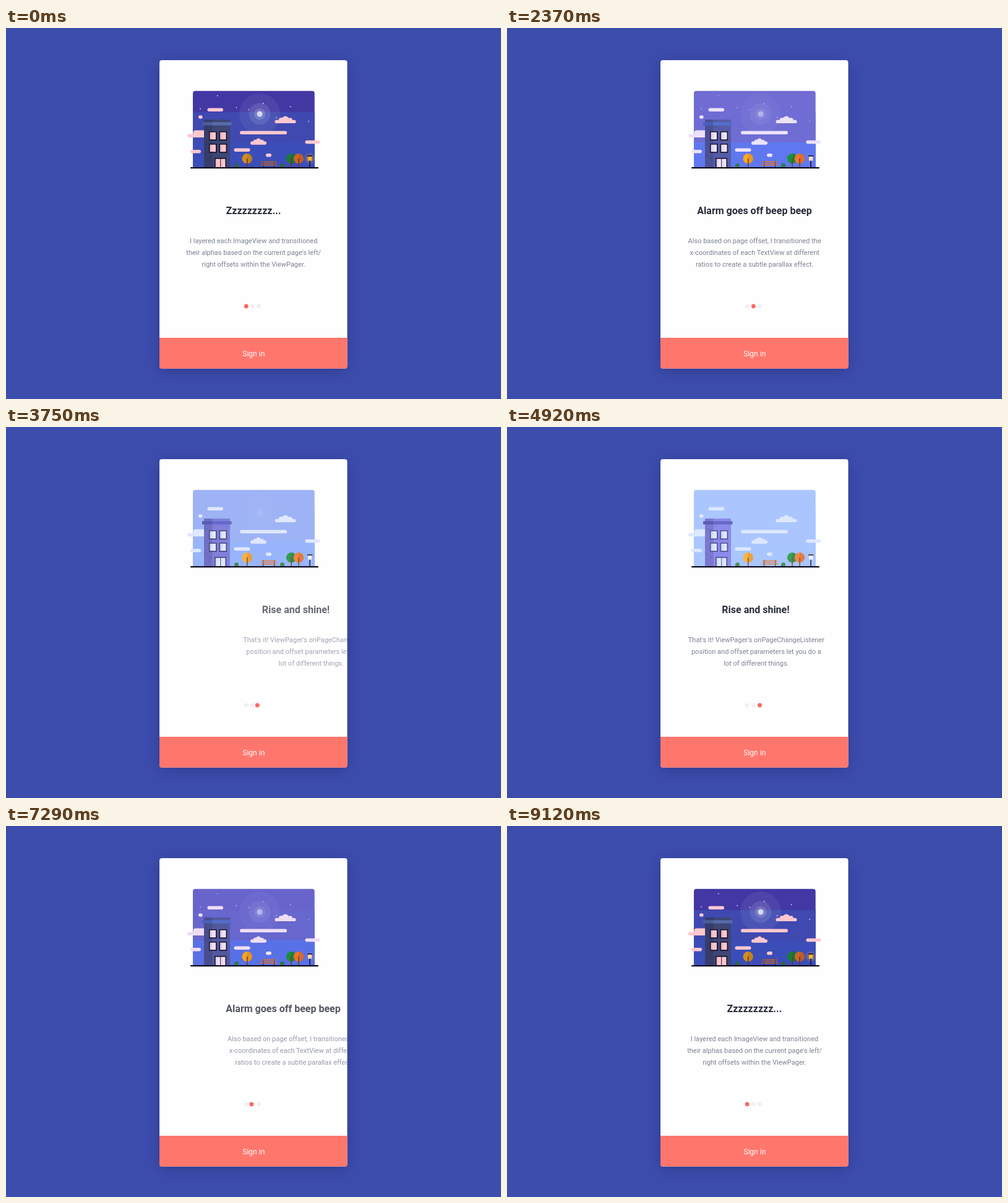
Write an HTML page that moves like this. It is 800x600 px and loops after 9150 ms.

```html
<!DOCTYPE html>
<html lang="en">
<head>
<meta charset="utf-8">
<title>Onboarding pager</title>
<style>
  html, body { margin: 0; width: 100%; height: 100%; overflow: hidden; background: #3d4dae; }
  svg { display: block; width: 800px; height: 600px; }
  text { font-family: Roboto, sans-serif; text-anchor: middle; }
  .title { font-size: 16px; font-weight: 700; fill: #272c39; }
  .body { font-size: 11px; fill: #7a8193; }
  .button { font-size: 12px; fill: #fff; }
  .card { filter: drop-shadow(0 4px 12px rgba(15, 20, 70, .3)); }
</style>
</head>
<body>
<svg viewBox="0 0 800 600">
  <defs>
    <clipPath id="cardClip"><rect x="248" y="52" width="303.5" height="498.7" rx="4"/></clipPath>
    <clipPath id="skyClip"><rect x="302" y="101.7" width="196.7" height="140" rx="4"/></clipPath>
    <radialGradient id="glow">
      <stop offset="0" stop-color="#ffb52c" stop-opacity=".55"/>
      <stop offset="1" stop-color="#ffb52c" stop-opacity="0"/>
    </radialGradient>
  </defs>
  <rect width="800" height="600" fill="#3d4dae"/>
  <rect class="card" x="248" y="52" width="303.5" height="498.7" rx="4" fill="#fefefe"/>
  <g clip-path="url(#cardClip)">
    <g id="scene"></g>
    <g id="pages"></g>
    <g id="dots"></g>
    <rect x="248" y="501" width="304" height="50" fill="#ff766c"/>
    <text class="button" x="400.3" y="531">Sign in</text>
  </g>
</svg>
<script>
const LOOP = 9150, STEP = 30;
const TITLE_SHIFT = 304, BODY_SHIFT = 413, TEXT_FADE = 1.3;
const DRAG_PART = 0.35, DRAG_POWER = 2.14;

// A slow drag, then a fling that settles on the next page
const SWIPES = [
  { start: 0, release: 1558, end: 2311, from: 0, to: 1 },
  { start: 2590, release: 3493, end: 4839, from: 1, to: 2 },
  { start: 4780, release: 5686, end: 6992, from: 2, to: 1 },
  { start: 6690, release: 7560, end: 9584, from: 1, to: 0 }
];

const PAGES = [
  ["Zzzzzzzzz...",
    "I layered each ImageView and transitioned",
    "their alphas based on the current page's left/",
    "right offsets within the ViewPager."],
  ["Alarm goes off beep beep",
    "Also based on page offset, I transitioned the",
    "x-coordinates of each TextView at different",
    "ratios to create a subtle parallax effect."],
  ["Rise and shine!",
    "That's it! ViewPager's onPageChangeListener",
    "position and offset parameters let you do a",
    "lot of different things."]
];

const NS = "http://www.w3.org/2000/svg";
const byId = id => document.getElementById(id);
const scene = byId("scene");
const painted = [], faded = [];

const lerp = (a, b, k) => a + (b - a) * k;
const rgb = hex => [1, 3, 5].map(i => parseInt(hex.slice(i, i + 2), 16));
const blend = (a, b, k) => a.map((c, i) => lerp(c, b[i], k));

// Colours for night, dawn and day; lit() derives all three from the dawn colour
const tones = (...hexes) => hexes.map(rgb);
const lit = hex => [blend(rgb(hex), [10, 10, 30], 0.17), rgb(hex), blend(rgb(hex), [255, 255, 255], 0.13)];

const SKY_TOP = tones("#4337a4", "#706cd3", "#abc7ff");
const SKY_MID = tones("#3f49b0", "#6f6dd4", "#abc7ff");
const SKY_LOW = tones("#3b4db8", "#5f78ef", "#a9c7ff");
const CLOUD = tones("#ffc8cf", "#ece2fa", "#dde8ff");
const WALL = tones("#3d4674", "#565ca6", "#8c8aea");
const ROOF = tones("#566ba9", "#536fd0", "#6967c8");
const FRAME = tones("#17132c", "#1c1838", "#54529c");
const GLASS = tones("#ffc8cf", "#efe5fb", "#dcebff");
const LAMP = tones("#f9b324", "#fbe1bd", "#edf1ff");
const METAL = lit("#1c1838"), GROUND = tones("#0d0b1d", "#0d0b1d", "#0d0b1d");
const TRUNK = lit("#74421f"), BUSH = lit("#217a40"), BENCH = lit("#d8763d");
const AMBER = lit("#fba826"), GREEN = lit("#1d9140"), ORANGE = lit("#f37730");

let seed = 11;
function random(min, max) {
  seed = (seed * 16807) % 2147483647;
  return lerp(min, max, seed / 2147483647);
}

function add(parent, tag, attrs, text) {
  const el = document.createElementNS(NS, tag);
  for (const key in attrs) el.setAttribute(key, attrs[key]);
  if (text) el.textContent = text;
  parent.appendChild(el);
  return el;
}
function paint(el, colors) {
  painted.push({ el, colors });
  return el;
}
function fade(el, ...levels) {
  faded.push({ el, levels });
  return el;
}
const rect = (x, y, width, height, colors, rx = 0, parent = scene) =>
  paint(add(parent, "rect", { x, y, width, height, rx }), colors);
const disc = (cx, cy, r, colors) => paint(add(scene, "circle", { cx, cy, r }), colors);
const shade = (x, y, width, height, opacity) =>
  add(scene, "rect", { x, y, width, height, fill: "#0f0c2b", opacity });

function drawSky() {
  const sky = add(scene, "g", { "clip-path": "url(#skyClip)" });
  rect(302, 101, 197, 125, SKY_TOP, 0, sky);
  rect(302, 136, 197, 90, SKY_MID, 0, sky);
  rect(302, 185, 197, 41, SKY_LOW, 0, sky);

  const stars = fade(add(scene, "g", { fill: "#fff" }), 0.9, 0.5, 0);
  for (let i = 0; i < 8; i++)
    add(stars, "circle", { cx: 320 + 24 * i + random(-6, 6), cy: random(107, 160), r: 0.85 });

  for (let i = 0; i < 3; i++) {
    const halo = add(scene, "circle", { cx: 410, cy: 139, r: 33 * 0.53 ** i, fill: "#f3f2ff" });
    fade(halo, 0.06 + 0.05 * i, 0.03 + 0.025 * i, 0);
  }
  fade(add(scene, "circle", { cx: 410, cy: 139, r: 4.5, fill: "#f3f2ff" }), 0.78, 0.42, 0);
}

const strip = (x, y, w) => rect(x, y, w, 5.4, CLOUD, 2.7);
function cloud(x, y, w) {
  strip(x, y, w);
  disc(x + w * 0.3, y, w * 0.11, CLOUD);
  disc(x + w * 0.5, y - 0.5, w * 0.165, CLOUD);
  disc(x + w * 0.72, y + 0.3, w * 0.11, CLOUD);
}

function drawClouds() {
  strip(325.5, 129.5, 25.5);
  strip(311, 141.3, 6.6);
  strip(378, 166.5, 76);
  strip(483.5, 181.8, 24);
  strip(368.5, 194.6, 26);
  strip(298, 197, 17);
  strip(420, 203, 9);
  strip(293, 171.5, 36);
  rect(302.5, 165.5, 26, 9, CLOUD, 4);
  cloud(434.5, 148.7, 34);
  cloud(395, 183.3, 26);
}

function drawHouse() {
  rect(320, 148, 42, 78, WALL);
  for (let i = 0; i < 14; i++)
    shade(random(321, 357), 160 + 4.5 * i, 3.5, 1, 0.2);
  shade(320, 148, 13.5, 78, 0.14);
  rect(317, 152.3, 47.5, 5.2, ROOF, 0.5);
  shade(317, 152.3, 16.5, 5.2, 0.14);

  for (const y of [167, 187]) for (const x of [328, 344.5]) {
    rect(x, y, 12.6, 15, FRAME);
    rect(x + 1.6, y + 1.6, 9.4, 11.6, GLASS);
    shade(x + 1.6, y + 1.6, 4, 11.6, 0.06);
  }
  rect(337, 210, 19, 16, FRAME);
  for (const x of [338.7, 347]) {
    rect(x, 211.7, 7.4, 14, GLASS);
    shade(x, 211.7, 3, 14, 0.06);
  }
}

function drawTree(x, leaves) {
  disc(x, 211.3, 8.2, leaves);
  add(scene, "path", { d: `M${x} 203.1a8.2 8.2 0 0 1 0 16.4Z`, fill: "#3a1608", opacity: 0.1 });
  rect(x - 0.8, 211, 1.6, 15, TRUNK);
}

function drawBush(x) {
  disc(x, 222.7, 3.4, BUSH);
  disc(x - 1, 222, 0.6, AMBER);
  disc(x + 1.2, 223.4, 0.6, ORANGE);
}

function drawBench() {
  for (const x of [415, 433]) rect(x, 215, 1.2, 11, METAL);
  rect(413, 215.6, 23.5, 1.6, BENCH);
  rect(413, 218.4, 23.5, 1.4, BENCH);
  rect(411.5, 221, 26.5, 1.5, BENCH);
}

function drawLamp() {
  fade(add(scene, "circle", { cx: 491, cy: 211, r: 10, fill: "url(#glow)" }), 1, 0.15, 0);
  rect(490.2, 214, 1.7, 12, METAL);
  rect(488, 207, 6.2, 7.6, LAMP);
  rect(487, 206, 8.2, 1.8, METAL);
}

drawSky();
drawClouds();
drawHouse();
drawTree(389.7, AMBER);
drawTree(461, GREEN);
drawTree(473, ORANGE);
drawBush(372.5);
drawBush(446.5);
drawBench();
drawLamp();
rect(298, 225, 207, 2.2, GROUND, 1);

const pages = PAGES.map(([title, ...lines]) => {
  const head = add(byId("pages"), "text", { class: "title", x: 400, y: 300.7 }, title);
  const body = add(byId("pages"), "g", { class: "body" });
  lines.forEach((line, i) => add(body, "text", { x: 400.2, y: 348 + 19 * i }, line));
  return { head, body };
});

const dotX = i => 388.2 + 10.15 * i;
const addDot = (i, fill) => add(byId("dots"), "circle", { cx: dotX(i), cy: 450, r: 3.4, fill });
for (let i = 0; i < 3; i++) addDot(i, "#f0f0f5");
const marker = addDot(0, "#f96a60");

function pageAt(t) {
  const { start, release, end, from, to } = SWIPES.filter(s => t >= s.start).pop();
  const k = t < release
    ? DRAG_PART * ((t - start) / (release - start)) ** DRAG_POWER
    : 1 - (1 - DRAG_PART) * Math.max(0, (end - t) / (end - release)) ** 5;
  return lerp(from, to, k);
}

function place(el, shift, opacity) {
  el.setAttribute("transform", `translate(${shift} 0)`);
  el.setAttribute("opacity", opacity);
}

function render(t) {
  const p = pageAt(t);
  const i = Math.min(1, Math.floor(p)), k = p - i;

  for (const { el, colors } of painted)
    el.setAttribute("fill", `rgb(${blend(colors[i], colors[i + 1], k).map(Math.round)})`);
  for (const { el, levels } of faded)
    el.setAttribute("opacity", lerp(levels[i], levels[i + 1], k));

  pages.forEach(({ head, body }, n) => {
    const off = n - p, alpha = Math.max(0, 1 - TEXT_FADE * Math.abs(off));
    place(head, off * TITLE_SHIFT, alpha);
    place(body, off * BODY_SHIFT, alpha);
  });
  marker.setAttribute("cx", dotX(p));
}

const origin = performance.now();
function tick(now) {
  const t = Math.max(0, now - origin) % LOOP;
  render(Math.floor(t / STEP) * STEP);
  requestAnimationFrame(tick);
}
render(0);
requestAnimationFrame(tick);
</script>
</body>
</html>
```
